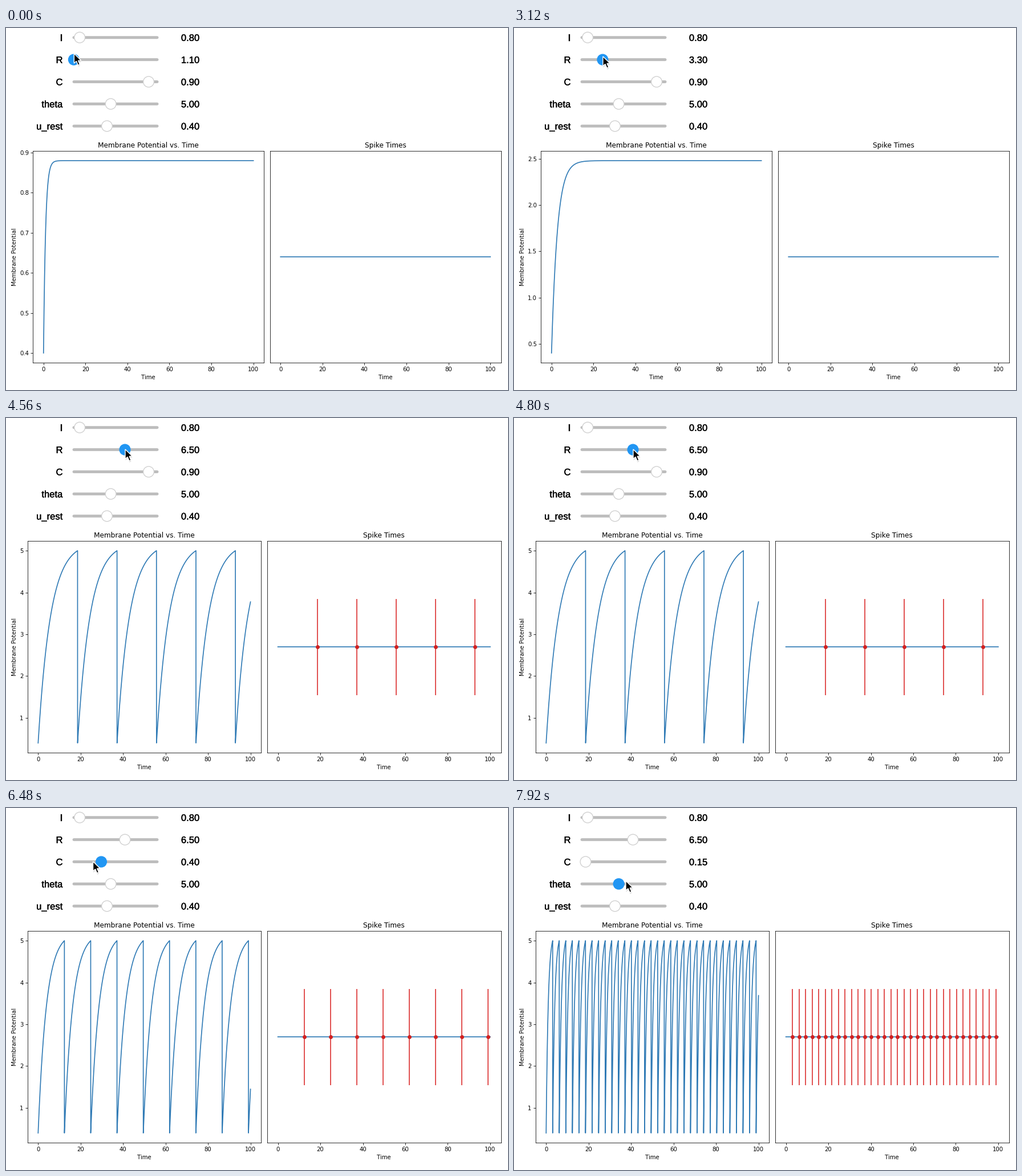
Recreate the animation shown at these times as a matplotlib script. Size 880 by 636 pixels, loop 8 s.

```python
import math
import numpy as np
import matplotlib.pyplot as plt
from matplotlib.animation import FuncAnimation
from matplotlib.patches import Circle, Polygon
from matplotlib.patheffects import withStroke

W, H = 880, 636
DPI = 100
PX = 72 / DPI           # points per pixel
S = 0.73                # chart scale relative to default sizes
INTERVAL, STEP, LOOP = 40, 120, 8000

plt.rcParams.update({
    "font.family": "DejaVu Sans",
    "font.size": 10 * S,
    "axes.linewidth": 0.8 * S,
    "axes.titlepad": 6 * S,
    "axes.labelpad": 4 * S,
    "lines.linewidth": 1.65 * S,
})
for axis in ("xtick", "ytick"):
    plt.rcParams.update({
        f"{axis}.major.size": 3.5 * S,
        f"{axis}.major.width": 0.8 * S,
        f"{axis}.major.pad": 3.5 * S,
    })

BLUE, RED = "#2f7ab5", "#d81e1e"
ACTIVE, TRACK, RIM = "#2196f3", "#bdbdbd", "#cfcfcf"
TOP, BOTTOM, RIGHT, GAP = 216.2, 587.9, 867.5, 10.8
TRACK_LEFT, TRACK_RIGHT = 117.2, 266.6

CURRENT, THETA, U_REST, DT = 0.8, 5.0, 0.4, 0.01
TICKS = np.arange(10001)
TIME = TICKS * DT


def ease(t, start, end):
    s = min(max((t - start) / (end - start), 0), 1)
    return s * s * (3 - 2 * s)


def resistance(t):
    value = (1.1 + 0.3 * ease(t, 0, 360) + 0.4 * ease(t, 720, 1440)
             + 0.865 * ease(t, 1680, 1920) + 3.835 * ease(t, 2660, 4380))
    return round(value, 1)


def capacitance(t):
    return round((0.9 - 0.75 * ease(t, 6070, 6740)) * 20) / 20


def pointer_tip(t):
    """Follow the R knob, cross to C, drag it left, then cross to theta."""
    cross, drag, leave = ease(t, 5160, 6000), ease(t, 6010, 6680), ease(t, 7440, 7920)
    x = sliders[1].position(resistance(t)) + 0.5 + 41 * cross - 124 * drag + 70 * leave
    y = (45 + 5 * ease(t, 0, 1440) + 5 * ease(t, 3120, 4400)
         + 39 * cross + 34 * leave)
    return np.array([x, y])


def membrane(r, c):
    """Leaky integrate-and-fire: potential over time and spike times."""
    target = r * CURRENT
    decay = 1 - DT / (r * c)
    phase, spikes = TICKS, np.array([])
    if target > THETA:
        period = math.ceil(math.log((target - THETA) / (target - U_REST))
                           / math.log(decay))
        phase = TICKS % period
        spikes = TIME[period::period]
    return target + (U_REST - target) * decay ** phase, spikes


def place(ax, left, right):
    ax.set_position([left / W, 1 - BOTTOM / H,
                     (right - left) / W, (BOTTOM - TOP) / H])


class Slider:
    def __init__(self, name, y, low, high):
        self.low, self.high, self.y = low, high, y
        style = dict(family="Liberation Sans", size=16.6 * PX, va="baseline",
                     path_effects=[withStroke(linewidth=0.25, foreground="black")])
        ui.text(99.5, y + 6, name, ha="right", **style)
        self.label = ui.text(323, y + 6, "", ha="center", **style)
        ui.plot([119, 265], [y, y], color=TRACK, lw=5 * PX, snap=False,
                solid_capstyle="round", zorder=1)
        self.knob = ui.add_patch(Circle((0, y), 9.4, lw=1.3 * PX, zorder=2))

    def position(self, value):
        share = (value - self.low) / (self.high - self.low)
        return TRACK_LEFT + share * (TRACK_RIGHT - TRACK_LEFT)

    def show(self, value, active):
        self.knob.center = self.position(value), self.y
        self.knob.set_facecolor(ACTIVE if active else "white")
        self.knob.set_edgecolor(ACTIVE if active else RIM)
        self.label.set_text(f"{value:.2f}")


fig = plt.figure(figsize=(W / DPI, H / DPI), dpi=DPI, facecolor="white")
left_ax, right_ax = fig.subplots(1, 2)
for ax, title in ((left_ax, "Membrane Potential vs. Time"),
                  (right_ax, "Spike Times")):
    ax.set_title(title)
    ax.set_xlabel("Time")
    ax.set_xlim(-5, 105)
left_ax.set_ylabel("Membrane Potential")
right_ax.set_yticks([])

curve, = left_ax.plot([], [], color=BLUE, snap=False)
middle, = right_ax.plot([], [], color=BLUE, snap=False)
bars = right_ax.vlines([], 0, 1, color=RED, lw=1.5 * S, zorder=3)
dots, = right_ax.plot([], [], "o", color=RED, ms=6 * S, mec="#b82a2a",
                      mew=0.8 * S, zorder=4)

ui = fig.add_axes([0, 0, 1, 1], zorder=5)
ui.set(xlim=(0, W), ylim=(H, 0))
ui.axis("off")

RANGES = {"I": (0, 10), "R": (1, 10), "C": (0.1, 1), "theta": (1, 10), "u_rest": (0, 1)}
sliders = [Slider(name, 16.7 + 38.9 * row, *limits)
           for row, (name, limits) in enumerate(RANGES.items())]

ARROW = np.array([(0, 0), (0, 17), (4, 13.3), (7, 20.3), (10, 19),
                  (7.1, 12.3), (12.3, 12)])
shadow = ui.add_patch(Polygon(ARROW, fc="black", alpha=0.13, lw=0, zorder=5))
pointer = ui.add_patch(Polygon(ARROW, fc="black", ec="white", lw=1.4 * PX, zorder=6))


def draw_charts(r, c):
    u, spikes = membrane(r, c)
    low, high = u.min(), u.max()
    span, mid = high - low, (high + low) / 2
    for ax in (left_ax, right_ax):
        ax.set_ylim(low - 0.05 * span, high + 0.05 * span)
    curve.set_data(TIME, u)
    middle.set_data([0, 100], [mid, mid])
    bars.set_segments([[(s, mid - span / 4), (s, mid + span / 4)] for s in spikes])
    dots.set_data(spikes, np.full(len(spikes), mid))

    # wider tick labels push the left chart inwards
    labels = left_ax.yaxis.get_major_formatter().format_ticks(left_ax.get_yticks())
    size = max(map(len, labels))
    left = 37.7 + 9.66 * (size > 1) + 6.44 * (size > 3)
    width = (RIGHT - left - GAP) / 2
    place(left_ax, left, left + width)
    place(right_ax, RIGHT - width, RIGHT)


def update(frame):
    t = frame * INTERVAL // STEP * STEP
    # the charts trail the sliders by one step
    draw_charts(resistance(t - STEP), capacitance(t - STEP))

    active = 1 if t < 5280 else 2 if 5760 <= t < 7680 else 3 if t >= 7800 else None
    values = (CURRENT, resistance(t), capacitance(t), THETA, U_REST)
    for row, (slider, value) in enumerate(zip(sliders, values)):
        slider.show(value, row == active)

    tip = pointer_tip(t)
    pointer.set_xy(ARROW + tip)
    shadow.set_xy(ARROW + tip + (0.5, 2.5))
    return []


animation = FuncAnimation(fig, update, frames=LOOP // INTERVAL, interval=INTERVAL,
                          init_func=lambda: update(0), repeat=True,
                          repeat_delay=0, blit=False)
plt.show()
```
